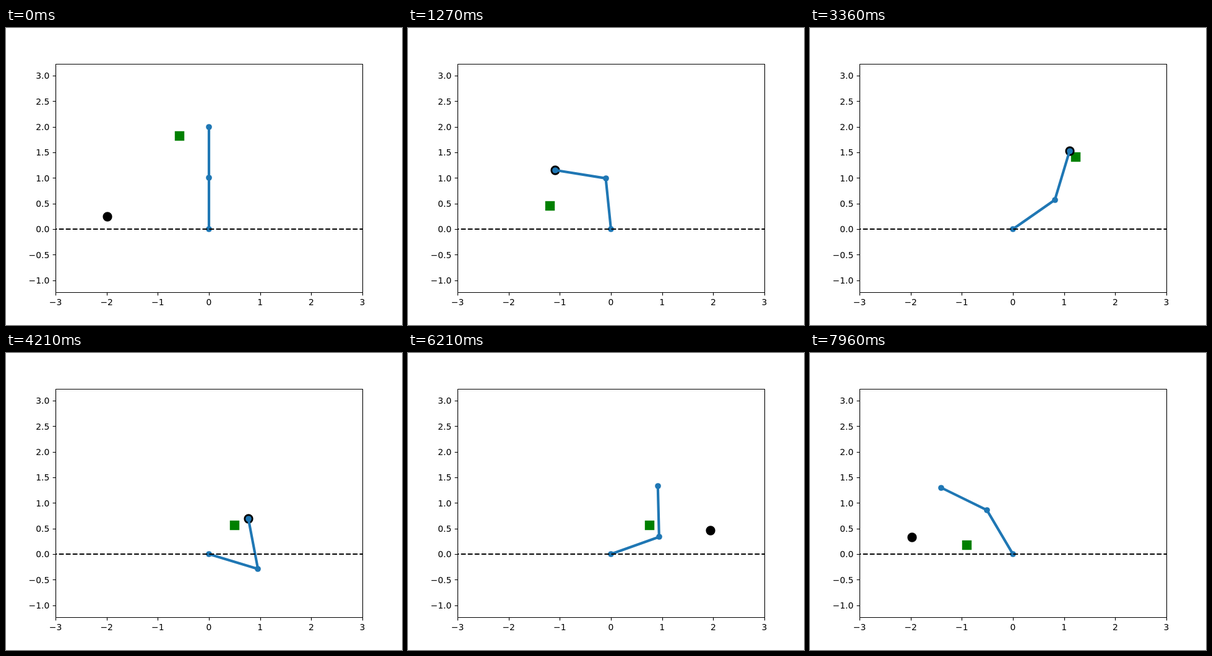
Recreate the animation shown at these times as an HTML page with a canvas. Size 640 by 480 pixels, loop 7.99 s.

```html
<!DOCTYPE html>
<html lang="en">
<head>
<meta charset="utf-8">
<title>Two-joint arm: pick and place</title>
<style>
  html, body { margin: 0; width: 100%; height: 100%; overflow: hidden; background: #fff; }
  canvas { display: block; width: 640px; height: 480px; }
</style>
</head>
<body>
<canvas id="stage" width="640" height="480"></canvas>
<script>
const ctx = document.getElementById('stage').getContext('2d');
const LOOP = 7990, STEP = 30, HOLD = 100;
const UNIT = 496 / 6, ORIGIN_X = 328, ORIGIN_Y = 325.07;
const BLUE = '#1f77b4';
const HOME = [90, 0];

// Joint angles in degrees (shoulder, elbow) and the number of steps for each move.
const jobs = [
  { ball: [170.1, 5.8],  goal: [91.3, 32.5],   reach: 12, carry: 12 },
  { ball: [63.5, 11.5],  goal: [108.8, 100.4], reach: 3,  carry: 14 },
  { ball: [46.5, 2.5],   goal: [-16.6, 63.5],  reach: 16, carry: 10 },
  { ball: [107, 3],      goal: [28.4, 41.5],   reach: 20, carry: 12 },
  { ball: [-2, 7],       goal: [-19.2, 136],   reach: 5,  carry: 21 },
  { ball: [12.9, 10.3],  goal: [29.9, 150.9],  reach: 20, carry: 23 },
  { ball: [11.1, 4.7],   goal: [-24.8, 123.9], reach: 24, carry: 19 },
  { ball: [169.1, 3],    goal: [106.2, 124.9], reach: 32, carry: 12 }
];

const px = x => ORIGIN_X + x * UNIT;
const py = y => ORIGIN_Y - y * UNIT;
const mix = (a, b, s) => a.map((v, i) => v + (b[i] - v) * s);

function joints([shoulder, elbow]) {
  const a = shoulder * Math.PI / 180, b = a + elbow * Math.PI / 180;
  const x = Math.cos(a), y = Math.sin(a);
  return [[px(0), py(0)], [px(x), py(y)], [px(x + Math.cos(b)), py(y + Math.sin(b))]];
}
const tip = pose => joints(pose)[2];

function sceneAt(time) {
  let start = HOME;
  for (const job of jobs) {
    const length = (job.reach + job.carry + 1) * STEP + HOLD;
    if (time < length) {
      const n = Math.floor(time / STEP);
      if (n <= job.reach) {
        return { pose: mix(start, job.ball, n / job.reach), ball: job.ball, goal: job.goal };
      }
      const done = Math.min(n - job.reach - 1, job.carry) / job.carry;
      const pose = mix(job.ball, job.goal, done);
      return { pose, ball: pose, goal: job.goal };
    }
    time -= length;
    start = job.goal;
  }
}

function disc([x, y], radius, color) {
  ctx.fillStyle = color;
  ctx.beginPath();
  ctx.arc(Math.round(x), Math.round(y), radius, 0, 2 * Math.PI);
  ctx.fill();
}

function stroke(points, color, width, dash = []) {
  ctx.strokeStyle = color;
  ctx.lineWidth = width;
  ctx.setLineDash(dash);
  ctx.beginPath();
  points.forEach(p => ctx.lineTo(...p));
  ctx.stroke();
}

function drawAxes() {
  const label = (v, digits) => v.toFixed(digits).replace('-', '\u2212');
  const snap = v => Math.round(v) + 0.5;
  ctx.fillStyle = '#000';
  ctx.font = '13.89px "DejaVu Sans", sans-serif';
  ctx.textAlign = 'center';
  for (let x = -3; x <= 3; x++) {
    const tx = snap(px(x));
    stroke([[tx, 427.5], [tx, 432.4]], '#000', 1.11);
    ctx.fillText(label(x, 0), px(x), 448);
  }
  ctx.textAlign = 'right';
  for (let y = -1; y <= 3; y += 0.5) {
    const ty = snap(py(y));
    stroke([[75.6, ty], [80.5, ty]], '#000', 1.11);
    ctx.fillText(label(y, 1), 70.3, Math.round(py(y) + 5.2));
  }
  ctx.lineWidth = 1.11;
  ctx.strokeRect(80.5, 58.5, 496, 369);
}

function draw(time) {
  const { pose, ball, goal } = sceneAt(time);
  ctx.fillStyle = '#fff';
  ctx.fillRect(0, 0, 640, 480);

  const [gx, gy] = tip(goal).map(Math.round);
  ctx.fillStyle = '#008000';
  ctx.fillRect(gx - 7.2, gy - 7.2, 15.4, 15.4);
  disc(tip(ball), 7.64, '#000');

  const arm = joints(pose);
  ctx.lineJoin = 'round';
  stroke(arm, BLUE, 4.17);
  arm.forEach(p => disc(p, 4.86, BLUE));

  // The ground line runs from x = -4, so its dashes start outside the axes.
  ctx.save();
  ctx.beginPath();
  ctx.rect(80, 58, 496, 369);
  ctx.clip();
  stroke([[px(-4), 325], [px(4), 325]], '#000', 2.08, [7.708, 3.333]);
  ctx.restore();

  drawAxes();
}

const begin = performance.now();
function tick() {
  draw((performance.now() - begin) % LOOP);
  requestAnimationFrame(tick);
}
tick();
</script>
</body>
</html>
```
